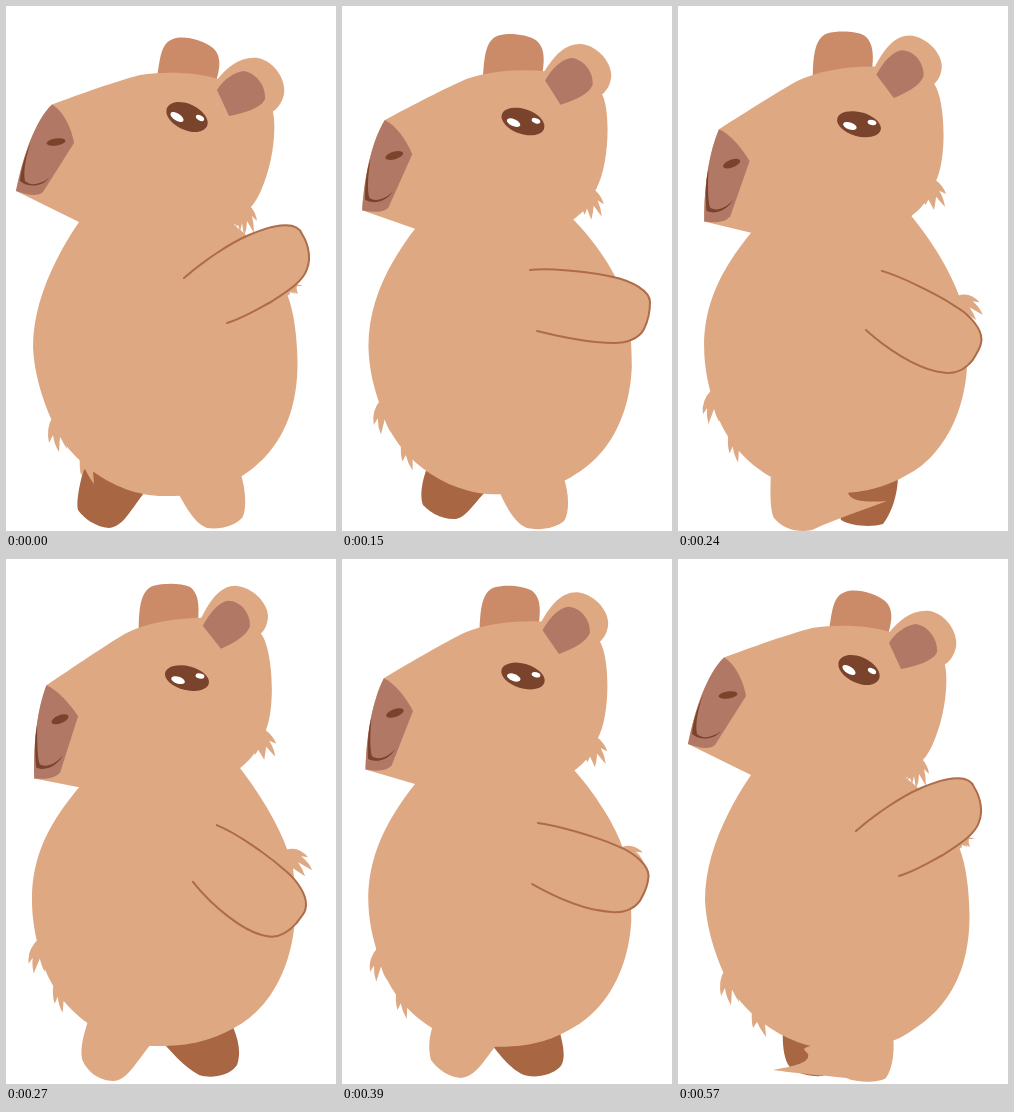
Animation of 330x525 px, one loop 0.6 s. Source, as an HTML page:

```html
<!DOCTYPE html>
<html lang="en">
<head>
<meta charset="utf-8">
<title>Dancing capybara</title>
<style>
  html, body { margin: 0; width: 100%; height: 100%; overflow: hidden; background: #fff; }
  svg { display: block; width: 330px; height: 525px; }
</style>
</head>
<body>
<svg id="stage" viewBox="0 0 330 525"></svg>
<script>
const STEP = 30, STEPS = 20;
const TAN = '#dea882', DARK = '#a86643', PINK = '#b27866', BROWN = '#7a432c', EAR = '#cc8b68', LINE = '#ae6c48';
const stage = document.getElementById('stage');

function add(tag, fill) {
  const node = document.createElementNS('http://www.w3.org/2000/svg', tag);
  node.setAttribute('fill', fill);
  return stage.appendChild(node);
}

// Weighted sum of paths that share the same commands.
function blend(paths, weights) {
  const values = paths.map(path => path.match(/[\d.]+/g).map(Number));
  let i = 0;
  return paths[0].replace(/[\d.]+/g, () => {
    const sum = values.reduce((total, list, k) => total + list[i] * weights[k], 0);
    i++;
    return sum.toFixed(2);
  });
}
const mix = (a, b, p) => blend([a, b], [1 - p, p]);

const parts = [];
function morph(fill, up, down) {
  const node = add('path', fill);
  parts.push(p => node.setAttribute('d', mix(up, down, p)));
}

// Each pose is [cx, cy, rx, ry, rotation].
function oval(fill, up, down) {
  const node = add('ellipse', fill);
  parts.push(p => {
    const [x, y, rx, ry, turn] = up.map((v, i) => v + (down[i] - v) * p);
    node.setAttribute('rx', rx);
    node.setAttribute('ry', ry);
    node.setAttribute('transform', `translate(${x} ${y}) rotate(${turn})`);
  });
}

const darkLeg = add('path', DARK);

// back ear
morph(EAR,
  'M151 72C154 52 155 37 167 33C178 29 197 34 207 42C217 51 213 65 210 76Z',
  'M133 74C133 52 134 32 147 27C158 24 175 24 184 28C195 36 193 52 192 66Z');

// fur: neck, back, hip, thigh
morph(TAN,
  'M243 199Q250 206 251 215L246 210Q248 218 248 227L241 215Q241 223 238 230L236 217Q235 222 234 225L232 219L228 222L236 205Z',
  'M259 171Q267 177 270 185L263 182Q268 190 269 198L260 188Q259 195 258 201L252 191Q251 193 249 196L248 194L243 199L250 180Z');
morph(TAN,
  'M279 280Q288 276 297 280L291 280Q290 283 292 288L286 285Q288 286 290 288L284 286L284 288L281 290Z',
  'M279 291Q292 286 302 298L295 297Q303 303 306 311L292 303Q297 310 299 317L287 309L288 320L281 305Z');
morph(TAN,
  'M46 412Q40 422 43 437L47 429Q48 438 53 446L54 430Q57 437 61 443L60 434L64 430Z',
  'M32 381Q21 392 23 405L27 399Q26 407 28 415L34 400Q36 408 39 413L40 405L44 400Z');
morph(TAN,
  'M74 450Q73 461 75 469L79 463Q82 470 88 478L87 465L92 466L85 448Z',
  'M48 424Q46 436 49 445L52 438Q53 447 57 454L58 442L62 446L60 424Z');

// body
morph(TAN,
  'M73 216C50 250 27 295 27 341C28 365 35 390 46 415C58 448 105 491 160 490C200 490 220 482 236 470C275 445 292 405 291.5 355C291 330 288 305 281 288C275 265 250 235 228 219Z',
  'M73 228C45 262 26 295 26 340C26 360 29 375 33 390C46 452 103 489 157 487C190 487 212 478 228 469C265 450 285 407 288.5 365C289 340 287 305 281 290C270 260 250 230 234 209Z');

const lightLeg = add('path', TAN);

// head
morph(TAN,
  'M73 216L10 185C17 150 29 115 46 98.5C74 88 111 75 134 69C160 65 190 66 212 73C240 80 262 95 267 106C272 130 263 180 245 201C240 210 234 216 228 219L150 260Z',
  'M73 228L28 219C27 180 32 148 40.5 126C69 107 99 87 117 76C135 66 160 60 195 59C225 60 247 68 255 75C267 90 270 150 259 173C253 192 243 202 234 209L150 260Z');

// front ear
morph(TAN,
  'M210 75C222 60 235 50 252 52C270 56 280 75 278 88C276 98 270 104 266 106L225 112Z',
  'M195 60C205 40 215 27 230 27C250 29 264 48 262 60C261 68 258 72 255 75L215 92Z');
morph(PINK,
  'M211 84C217 74 228 66 238 65C250 67 260 80 259 93C255 103 235 108 223 110Z',
  'M197 67C204 54 212 44 222 42C235 42 245 55 244 68C240 78 226 85 215 90Z');

// muzzle, mouth, nostril
morph(PINK,
  'M46 98.5C56 104 65 120 68 137L37 186C32 191 20 189 10 185C17 150 29 115 46 98.5Z',
  'M40.5 126C52 131 64 145 72 157L54 213C48 220 38 220 28 219C27 180 32 148 40.5 126Z');
morph(BROWN,
  'M25 136C19 149 15 163 14 175C22 182 36 181 43 172C34 179 24 180 19 175C17 165 20 150 25 136Z',
  'M31 166C28 180 29 195 30 208C38 212 50 208 57 196C48 206 40 208 34 205C31 200 31 180 31 166Z');
oval(BROWN, [50, 136, 9.5, 3.5, -8], [54, 160, 9, 4, -22]);

// eye
oval(BROWN, [181, 111, 22, 13, 25], [181, 119, 22.5, 12, 14]);
oval('#fff', [171, 111, 7.5, 3.5, 33], [172, 121, 7, 3.5, 17]);
oval('#fff', [194, 112, 4.5, 2.5, 30], [194, 117, 4.5, 2.5, 12]);

const arm = add('path', TAN);
arm.setAttribute('stroke', LINE);
arm.setAttribute('stroke-width', 2);
arm.setAttribute('stroke-linecap', 'round');
const armPoses = [
  'M178 272C195 257 222 238 243 229C262 221 290 212 296 228C303 239 305 253 301 263C297 276 280 286 265 296C250 304 235 313 221 317',
  'M188 264C205 262 245 265 271 271C290 275 308 285 308 296C308 305 306 315 302 323C297 333 284 337 272 337C245 337 215 330 195 325',
  'M210 266C230 274 260 294 280 311C290 319 303 335 300 348C300 352 296 356 291 363C282 373 272 378 262 376C238 373 205 345 187 323'
];

const legs = {
  apart: {
    dark: ['M78 462C73 480 70 497 72 504C80 515 92 521 103 522C117 520 122 508 138 487L120 460Z',
           'M85 462C79 478 78 492 81 499C89 508 103 514 114 513C124 511 130 500 144 485L120 460Z'],
    light: ['M172 487C182 505 190 518 201 522C216 524 229 519 236 512C241 504 240 482 234 466L200 450Z',
            'M158 487C165 503 174 518 185 522C198 525 214 522 222 515C228 506 227 485 221 470L190 450Z']
  },
  swapped: {
    dark: ['M159 486C170 498 180 509 193 516C205 520 224 517 231 506C235 495 233 482 227 468L200 450Z',
           'M150 486C160 499 170 511 182 516C194 520 215 515 220 505C224 495 220 482 217 470L200 450Z'],
    light: ['M82 462C78 475 74 488 76 500C82 515 95 522 108 522C122 520 128 506 145 485L120 455Z',
            'M91 466C87 478 86 490 89 501C97 512 108 518 119 519C133 517 140 505 155 485L120 455Z']
  },
  crossLeft: {
    dark: 'M150 470L163 514C175 521 195 521 205 518C214 506 219 490 220 472Z',
    light: 'M93 466C92 485 92 505 96 512C105 523 120 527 134 524C160 512 185 504 209 495C195 496 173 497 170 487L200 450L110 450Z'
  },
  crossRight: {
    dark: 'M105 470C104 485 106 500 111 507C118 514 130 518 145 517L150 470Z',
    light: 'M215 476C217 495 214 510 208 519C200 524 180 524 168 519C150 517 115 514 95 511C110 508 133 505 130 495C125 490 124 490 132 487L150 450L210 450Z'
  }
};

function drawLegs(n) {
  const slide = (pair, s) => ({ dark: mix(...pair.dark, s), light: mix(...pair.light, s) });
  let pose;
  if (n < 8) pose = slide(legs.apart, n / 5);
  else if (n < 9) pose = legs.crossLeft;
  else if (n < 15) pose = slide(legs.swapped, (Math.abs(n - 10) - 1) / 2);
  else pose = legs.crossRight;
  darkLeg.setAttribute('d', pose.dark);
  lightLeg.setAttribute('d', pose.light);
}

// Quadratic through the three arm poses at 0, MID and 1.
function drawArm(p) {
  const MID = 0.5625;
  arm.setAttribute('d', blend(armPoses, [
    (p - MID) * (p - 1) / MID,
    p * (p - 1) / (MID * (MID - 1)),
    p * (p - MID) / (1 - MID)
  ]));
}

function draw(time) {
  const n = Math.floor(time / STEP) % STEPS;
  const p = (n <= 10 ? n * 0.9 : 19 - n) / 8;
  parts.forEach(update => update(p));
  drawArm(p);
  drawLegs(n);
}

const start = performance.now();
function tick() {
  draw(performance.now() - start);
  requestAnimationFrame(tick);
}
tick();
</script>
</body>
</html>
```
